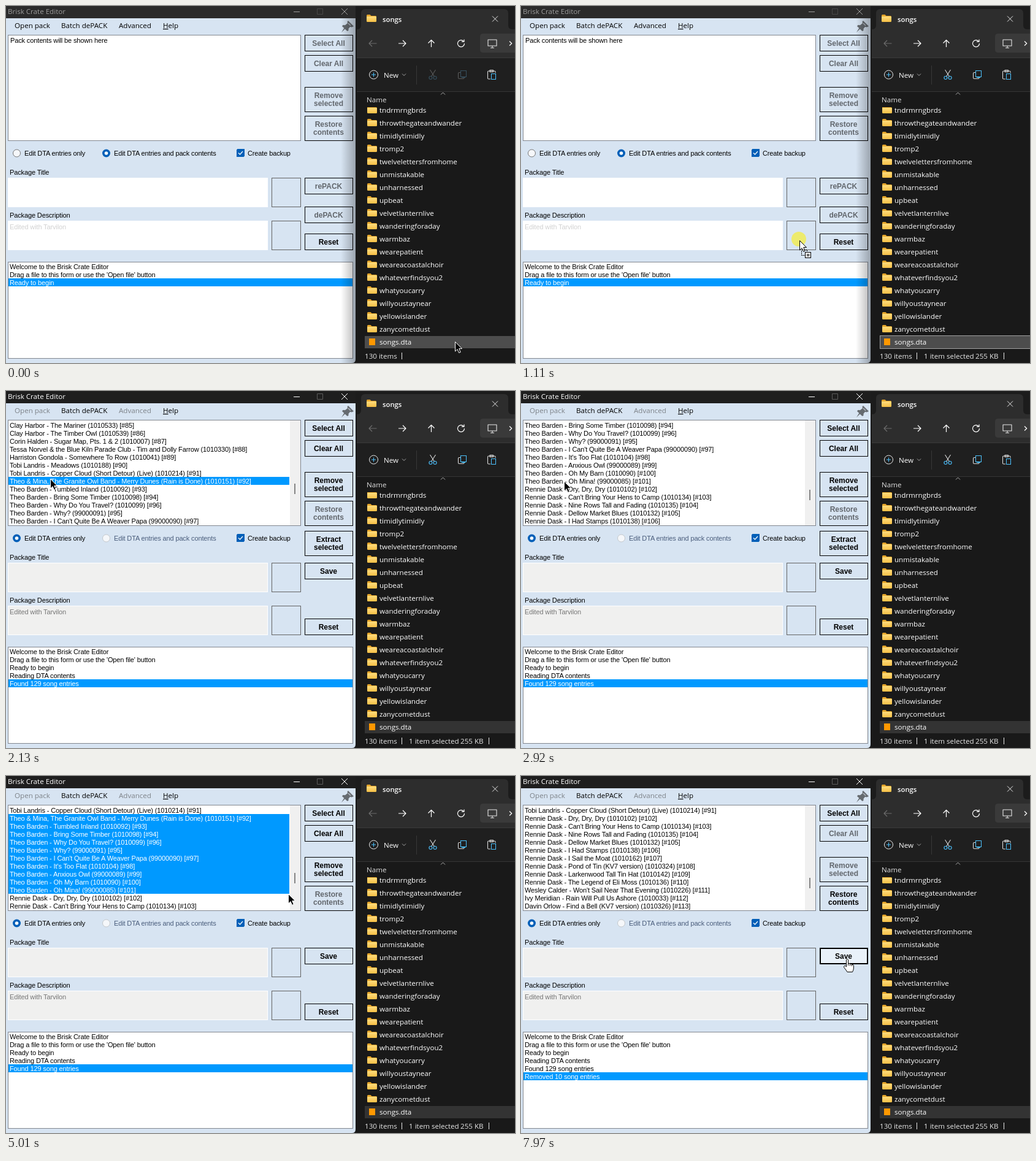
Recreate the animation shown at these times as an HTML page. Size 830 by 582 pixels, loop 8000 ms.

```html
<!DOCTYPE html>
<html lang="en">
<head>
<meta charset="utf-8">
<title>Pack editor demo</title>
<style>
html, body { margin: 0; width: 100%; height: 100%; overflow: hidden; background: #191919; }
svg { display: block; position: absolute; left: 0; top: 0; }
text { white-space: pre; }
.f { font: 11px "Liberation Sans", Arial, sans-serif; letter-spacing: -.13px; }
.b { font: bold 12px "Liberation Sans", Arial, sans-serif; text-anchor: middle; }
.u { font: 11.6px "Open Sans", "Noto Sans", sans-serif; }
rect { shape-rendering: crispEdges; }
</style>
</head>
<body>
<svg width="830" height="582" viewBox="0 0 830 582">
  <defs>
    <linearGradient id="shade"><stop stop-opacity="0"/><stop offset="1" stop-opacity=".28"/></linearGradient>
    <linearGradient id="gold" x2="0" y2="1"><stop stop-color="#ffdc7d"/><stop offset="1" stop-color="#f6bf45"/></linearGradient>
  </defs>
  <g id="explorer"></g>
  <g id="editor"></g>
  <g id="pointer">
    <circle id="press" cx="-1" cy="-2" r="12" fill="#fff000" fill-opacity=".55"/>
    <path id="arrow" d="M.5 .5V16L4 12.6L6.6 18.4L9.2 17.3L6.7 11.6H11.5Z"/>
    <g id="drag">
      <rect x="3.5" y="15.5" width="9" height="9" fill="none" stroke="#000" stroke-dasharray="2 1"/>
      <rect x="9.5" y="19.5" width="9" height="9" fill="#fff" stroke="#000"/>
      <path d="M14 21.5V27M11.5 24H17" stroke="#000"/>
    </g>
    <path id="hand" fill="#fff" stroke="#000" stroke-linejoin="round" d="M-1.5 13V1.5Q0 -1 1.5 1.5V8Q3 6.5 4.5 8.5Q6 7.3 7.4 9.3Q10 8.6 10.4 11V15Q10.4 18 8.5 21.5H0Q-2 18-5 14.5Q-6.5 12-4 11.2Q-2.6 11.6-1.5 13Z M1.5 8V11M4.5 8.5V11.5M7.4 9.3V12"/>
  </g>
</svg>
<script>
const LOOP = 8000;
const $ = id => document.getElementById(id);
const BLUE = '#0099ff', FORM = '#d7e4f2', HOVER = '#e9f1f9', ACCENT = '#005fb8', SKY = '#4cc2ff';
const EDGE = 570; // right side of the editor window

// artist: title, id, number
const songs = `Clay Harbor: The Mariner, 1010533, 85; The Timber Owl, 1010539, 86
Corin Halden: Sugar Map. Pts. 1 & 2, 1010007, 87
Tessa Norvel & the Blue Kiln Parade Club: Tim and Dolly Farrow, 1010330, 88
Harriston Gondola: Somewhere To Row, 1010041, 89
Tobi Landris: Meadows, 1010188, 90; Copper Cloud (Short Detour) (Live), 1010214, 91
Theo & Mina. The Granite Owl Band: Merry Dunes (Rain is Done), 1010151, 92
Theo Barden: Tumbled Inland, 1010092, 93; Bring Some Timber, 1010098, 94; Why Do You Travel?, 1010099, 96; Why?, 99000091, 95; I Can't Quite Be A Weaver Papa, 99000090, 97; It's Too Flat, 1010104, 98; Anxious Owl, 99000089, 99; Oh My Barn, 1010090, 100; Oh Mina!, 99000085, 101
Rennie Dask: Dry. Dry. Dry, 1010102, 102; Can't Bring Your Hens to Camp, 1010134, 103; Nine Rows Tall and Fading, 1010135, 104; Dellow Market Blues, 1010132, 105; I Had Stamps, 1010138, 106; I Sail the Moat, 1010162, 107; Pond of Tin (KV7 version), 1010324, 108; Larkenwood Tall Tin Hat, 1010142, 109; The Legend of Eli Moss, 1010136, 110
Wesley Calder: Won't Sail Near That Evening, 1010226, 111
Ivy Meridian: Rain Will Pull Us Ashore, 1010033, 112
Davin Orlow: Find a Bell (KV7 version), 1010326, 113`.split('\n').flatMap(line => {
  const [artist, list] = line.split(': ');
  return list.split('; ').map(item => {
    const [title, id, n] = item.split(', ');
    const name = `${artist} - ${title}`.replace(/(Map|Mina|Dry)\. /g, '$1, ');
    return { n: +n, text: `${name} (${id}) [#${n}]` };
  });
});

const folders = ('tndrmrngbrds throwthegateandwander timidlytimidly tromp2 twelvelettersfromhome ' +
  'unmistakable unharnessed upbeat velvetlanternlive wanderingforaday warmbaz wearepatient ' +
  'weareacoastalchoir whateverfindsyou2 whatyoucarry willyoustaynear yellowislander zanycometdust').split(' ');

const logLines = ['Welcome to the Brisk Crate Editor', "Drag a file to this form or use the 'Open file' button",
  'Ready to begin', 'Reading DTA contents', 'Found 129 song entries', 'Removed 10 song entries'];

const text = (x, y, s, fill = '#000', cls = 'f') => `<text class="${cls}" x="${x}" y="${y}" fill="${fill}">${s}</text>`;
const fill = (x, y, w, h, c) => `<rect x="${x}" y="${y}" width="${w}" height="${h}" fill="${c}"/>`;
const box = (x, y, w, h, c, line, lw = 1) =>
  `<rect x="${x + lw / 2}" y="${y + lw / 2}" width="${w - lw}" height="${h - lw}" fill="${c}" stroke="${line}" stroke-width="${lw}"/>`;
const line = (d, c, w = 1) => `<path d="${d}" fill="none" stroke="${c}" stroke-width="${w}" stroke-linejoin="round"/>`;

function button(y, h, label, on, hover = false, lw = 1) {
  const words = label.split('/');
  return box(487, y, 79, h, hover ? HOVER : FORM, '#000', lw) + words.map((w, i) =>
    text(526, y + h / 2 + 4.2 + 13 * (i - (words.length - 1) / 2), w, on ? '#000' : '#62676d', 'b')).join('');
}

function radio(x, on, enabled) {
  return on ? `<circle cx="${x}" cy="240" r="6.5" fill="${ACCENT}"/><circle cx="${x}" cy="240" r="2.8" fill="#fff"/>`
    : `<circle cx="${x}" cy="240" r="6" fill="#f5f7fa" stroke="${enabled ? '#767676' : '#c4c8cc'}"/>`;
}

function songList(s) {
  let out = box(3, 47, 478, 173, '#fff', '#828790');
  if (!s.loaded) return out + text(7, 60, 'Pack contents will be shown here');
  const rows = s.removed ? songs.filter(r => r.n < 92 || r.n > 101) : songs;
  const start = s.top - 85;
  rows.slice(start, start + 13).forEach((r, i) => {
    const on = !s.removed && r.n >= 92 && r.n <= s.selTo;
    if (on) out += fill(4, 49 + 13 * i, 458, 13, BLUE);
    out += text(6, 60 + 13 * i, r.text, on ? '#fff' : '#000');
  });
  return out + fill(463, 48, 17, 171, '#f0f0f0') +
    fill(470, Math.round(151 + start * 1.1 + (s.removed ? 8 : 0)), 2, 17, '#858585');
}

function editor(s) {
  const { loaded } = s;
  const dim = loaded ? '#7d8288' : '#000', cap = loaded ? '#fff' : '#9c9c9c';
  const field = loaded ? '#f0f0ef' : '#fff';
  let o = `<path d="M0 0H${EDGE}V576Q${EDGE} 582 ${EDGE - 6} 582H0Z" fill="${FORM}"/>` +
    fill(0, 0, EDGE, 20, loaded ? '#1e1e1e' : '#2b2b2b') +
    text(3, 13, 'Brisk Crate Editor', cap, 'u') +
    line('M469 9.5H479', cap) + line('M507.5 4.5H516.5V13.5H507.5Z', loaded ? '#5c5c5c' : '#484848') +
    line('M547 4L557 14M557 4L547 14', cap);
  o += text(14, 36, 'Open pack', dim, 'u') + text(90, 36, 'Batch dePACK', '#000', 'u') +
    text(184, 36, 'Advanced', dim, 'u') + text(256, 36, '<tspan text-decoration="underline">H</tspan>elp', '#000', 'u');
  o += '<path d="M558 24L567 33L564 34.5L561 34L558.5 37L558.5 40L556.5 41L552.7 37.5L547 43L551.3 36L548 33L549.5 31L553 31.2L557 28L556.5 25.5Z" fill="#666b70"/>' +
    line('M558 28L562 32', '#b5bcc4', 1.5);
  o += songList(s);
  o += button(47, 27, 'Select All', loaded) + button(80, 27, 'Clear All', loaded && !s.done) +
    button(132, 41, 'Remove/selected', loaded && !s.done, s.hover === 'remove') +
    button(179, 41, 'Restore/contents', s.done);
  if (s.extract) o += button(228, 41, 'Extract/selected', true);
  o += button(280, 27, loaded ? 'Save' : 'rePACK', loaded, s.hover === 'save', s.done ? 2 : 1);
  if (!loaded) o += button(327, 27, 'dePACK', false);
  o += button(371, 27, 'Reset', true);
  o += radio(17.5, loaded, true) + text(30, 244, 'Edit DTA entries only') +
    radio(163.5, !loaded, !loaded) + text(176, 244, 'Edit DTA entries and pack contents', loaded ? '#4a5d7c' : '#000') +
    `<rect x="376" y="233" width="13" height="13" rx="2" fill="${ACCENT}"/>` +
    line('M379 239.5L381.5 242L386 237', '#fff', 1.2) + text(394, 244, 'Create backup');
  o += text(6, 275, 'Package Title') + text(6, 345, 'Package Description') +
    box(3, 280, 424, 48, field, '#fff') + box(3, 350, 424, 48, field, '#fff') +
    text(6, 364, 'Edited with Tarvilon', loaded ? '#777' : '#d2d2d2') +
    box(433, 280, 48, 48, FORM, '#646464') + box(433, 350, 48, 48, FORM, '#646464');
  o += box(3, 417, 563, 158, '#fff', '#828790');
  const count = s.removed ? 6 : loaded ? 5 : 3;
  logLines.slice(0, count).forEach((l, i) => {
    const on = i === count - 1;
    if (on) o += fill(4, 418 + 13 * i, 561, 13, BLUE);
    o += text(6, 429 + 13 * i, l, on ? '#fff' : '#000');
  });
  if (!loaded) o += fill(546, 20, EDGE - 546, 562, 'url(#shade)');
  return o;
}

function folder(x, y) {
  return `<path d="M${x} ${y + 1.5}q0-1.5 1.5-1.5h4l2 2h7q1.5 0 1.5 1.5v7h-16z" fill="#e5a52a"/>` +
    `<path d="M${x} ${y + 4}q0-1 1-1h14q1 0 1 1v6.5q0 1.5-1.5 1.5h-13q-1.5 0-1.5-1.5z" fill="url(#gold)"/>`;
}

function explorer(s) {
  const edge = s.picked ? '#d8d8d8' : '#5b5b5b', tint = s.picked ? SKY : '#36505f';
  let o = fill(564, 0, 266, 582, '#191919') + fill(570, 0, 260, 38, '#1c1c1c') +
    '<path d="M573 38Q579 38 579 31V12Q579 5 586 5H812Q819 5 819 12V31Q819 38 825 38Z" fill="#2d2d2d"/>' +
    fill(572, 38, 258, 46, '#2d2d2d') + fill(572, 84, 258, 1, '#3a3a3a') + fill(572, 85, 258, 54, '#1f1f1f') +
    fill(572, 139, 258, 1, '#363636');
  folders.forEach((name, i) => {
    o += folder(589, 163 + 21 * i) + text(609, 174 + 21 * i, name, '#fff', 'u');
  });
  o += fill(572, 140, 258, 25, '#191919') + text(588, 157, 'Name', '#e0e0e0', 'u') + line('M709 144.5L712.5 141L716 144.5', '#b0b0b0');
  o += folder(588, 14) + `<text class="u" x="614" y="26" fill="#fff" style="font-weight:600;font-size:11.3px">songs</text>` +
    line('M793 16.5L802 25.5M802 16.5L793 25.5', '#e8e8e8');
  o += line('M604.5 61H592M597 56L592 61L597 66', '#6c6c6c', 1.2) +
    line('M640 61H652M647 56L652 61L647 66', '#fff', 1.2) +
    line('M693.5 67V55.5M688.5 60.5L693.5 55.5L698.5 60.5', '#fff', 1.2) +
    line('M746 57.3A5.5 5.5 0 1 0 747.5 61M747 54.5V58.2H743', '#fff', 1.2) +
    '<path d="M830 45H778Q773 45 773 50V71Q773 76 778 76H830Z" fill="#3a3a3a"/>' +
    line('M786 55H800V65H786ZM790 68.3H796M793 65V68', '#e8e8e8', 1.1) + line('M821 57.5L824.7 61L821 64.5', '#fff', 1.2);
  o += '<circle cx="599.5" cy="112" r="7" fill="none" stroke="#e8e8e8"/>' + line('M599.5 108.5V115.5M596 112H603', SKY) +
    text(616, 117, 'New', '#fff', 'u') + line('M646 110.5L649 113.5L652 110.5', '#a8a8a8') + fill(669, 97, 1, 31, '#383838');
  o += line('M691.5 104L698.5 115M700.5 104L693.5 115', edge, 1.1) +
    `<g fill="none" stroke="${tint}" stroke-width="1.1"><circle cx="692.4" cy="117" r="2.5"/><circle cx="699.6" cy="117" r="2.5"/></g>` +
    line('M741 108.5H739Q737.5 108.5 737.5 110V117Q737.5 118.5 739 118.5H745.5Q747 118.5 747 117', edge, 1.1) +
    `<rect x="741.5" y="105.5" width="9" height="10.5" rx="1.5" fill="none" stroke="${tint}" stroke-width="1.1"/>` +
    line('M790 119H787Q785.5 119 785.5 117.5V107.5Q785.5 106 787 106H796.5Q798 106 798 107.5V109M789 106V104.5H794.5V107.5H789Z', '#dcdcdc', 1.1) +
    `<rect x="791.5" y="110.5" width="7" height="9" rx="1" fill="none" stroke="${SKY}" stroke-width="1.1"/>`;
  o += s.loaded ? fill(585, 538, 245, 20, '#333')
    : s.picked ? box(585, 537, 246, 22, '#4d4d4d', '#a0a0a0') : fill(585, 538, 245, 20, '#4d4d4d');
  o += fill(592, 542, 10, 11, '#ff9800') + text(609, 552, 'songs.dta', '#fff', 'u') +
    text(585, 575, '130 items', '#e8e8e8', 'u') + fill(645, 565, 1, 11, '#e8e8e8');
  if (s.picked) o += text(657, 575, '1 item selected', '#e8e8e8', 'u') + text(741, 575, '255 KB', '#e8e8e8', 'u') +
    fill(787, 565, 1, 11, '#e8e8e8');
  return o;
}

// start, end, number of steps, [share, x, y] points
const moves = [
  [70, 830, 11, [[0, 732, 547], [.5, 726, 549], [1, 722, 548]]],
  [900, 1390, 8, [[0, 722, 548], [.25, 610, 480], [.5, 454, 382], [1, 183, 152]]],
  [1720, 2130, 6, [[0, 183, 152], [.6, 72, 143], [1, 72, 143]]],
  [2920, 3610, 10, [[0, 72, 143], [.5, 60, 161], [1, 50, 150]]],
  [4330, 4600, 4, [[0, 50, 150], [1, 79, 58]]],
  [4800, 5500, 11, [[0, 79, 58], [4 / 11, 460, 192], [1, 522, 151]]],
  [7410, 7970, 9, [[0, 522, 151], [1, 532, 298]]]
];

function cursorAt(t) {
  const [start, end, n, pts] = moves.filter(m => t >= m[0]).pop() || moves[0];
  const step = Math.floor((t - start) / (end - start) * (n - 1) + 1e-6) + 1;
  const p = t < start ? 0 : Math.min(1, step / n);
  const i = Math.max(1, pts.findIndex(q => q[0] >= p - 1e-9));
  const [a, b] = [pts[i - 1], pts[i]], k = (p - a[0]) / (b[0] - a[0]);
  return [1, 2].map(j => Math.round(a[j] + (b[j] - a[j]) * k));
}

const within = (t, ...spans) => spans.some(([a, b]) => t >= a && t < b);

function stateAt(t, x, y) {
  const loaded = t >= 1720, done = t >= 6090;
  const over = (top, h) => loaded && x >= 487 && x < 566 && y >= top && y < top + h;
  return {
    loaded, done,
    picked: t >= 270,
    top: t < 2530 ? 85 : t < 2660 ? 88 : t < 2920 ? 91 : t < 4330 ? 94 : 91,
    selTo: t < 1960 ? 0 : t < 3940 ? 92 : 101,
    extract: loaded && t < 4070,
    removed: t >= 6020,
    hover: over(132, 41) && !done ? 'remove' : over(280, 27) ? 'save' : ''
  };
}

let lastKey;
function render(t) {
  const [x, y] = cursorAt(t);
  const s = stateAt(t, x, y), key = JSON.stringify(s);
  if (key !== lastKey) {
    $('explorer').innerHTML = explorer(s);
    $('editor').innerHTML = editor(s);
    lastKey = key;
  }
  const dragging = within(t, [900, 1390]);
  const show = (id, on) => $(id).setAttribute('visibility', on ? 'visible' : 'hidden');
  $('pointer').setAttribute('transform', `translate(${x} ${y})`);
  show('press', within(t, [200, 340], [690, 1390], [1960, 2120], [3810, 4070], [5630, 5760]));
  show('drag', dragging);
  show('hand', s.hover);
  show('arrow', !s.hover);
  $('arrow').setAttribute('fill', dragging ? '#fff' : '#000');
  $('arrow').setAttribute('stroke', dragging ? '#000' : '#fff');
}

const origin = performance.now();
function tick() {
  render((performance.now() - origin) % LOOP);
  requestAnimationFrame(tick);
}
tick();
</script>
</body>
</html>
```
